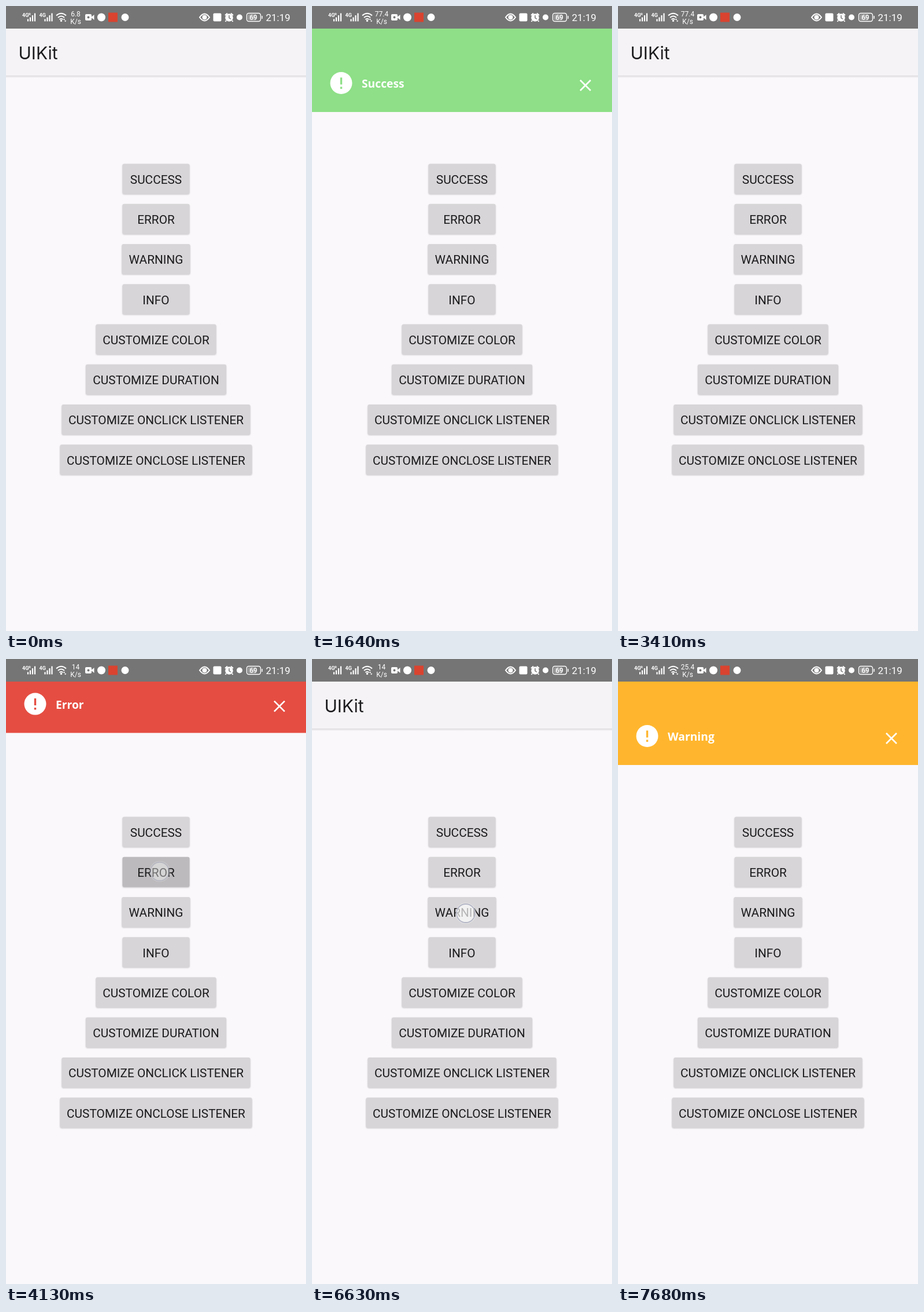
An HTML page for the animation above (8 s loop, 519 by 1079 pixels).

```html
<!DOCTYPE html>
<html lang="en">
<head>
<meta charset="utf-8">
<title>UIKit</title>
<style>
  html, body { margin: 0; width: 100%; height: 100%; overflow: hidden; background: #faf8fa; }
  svg { display: block; width: 519px; height: 1079px; font-family: Roboto, sans-serif; }
  .button { fill: #d7d5d7; filter: drop-shadow(0 1.5px 1px rgba(0, 0, 0, .2)); }
  .label { font-size: 20.8px; fill: #1a191b; text-anchor: middle; }
  .line { fill: none; stroke: #fff; }
  .mid { text-anchor: middle; }
</style>
</head>
<body>
<svg viewBox="0 0 519 1079">
  <defs>
    <linearGradient id="shade" x2="0" y2="1">
      <stop stop-color="#d9d7d9"/><stop offset="1" stop-color="#faf8fa"/>
    </linearGradient>
    <clipPath id="clip"><rect id="clipBox" width="116" height="52" rx="3"/></clipPath>
    <g id="bars">
      <path d="M10 26.5v-4M14 26.5v-7M18 26.5v-10.500M22 26.500v-14" stroke="#fff" stroke-width="2.200"/>
      <text y="19" font-size="9" font-weight="700" textLength="0">4G</text>
    </g>
  </defs>

  <rect width="519" height="1079" fill="#faf8fa"/>
  <rect y="119.500" width="519" height="5" fill="url(#shade)"/>
  <rect width="519" height="120" fill="#f5f3f5"/>
  <text x="21.500" y="91.500" font-size="30" fill="#1c1b1d" font-family="Inter, sans-serif">UIKit</text>

  <g id="buttons"></g>
  <circle id="ripple" clip-path="url(#clip)" opacity=".125"/>
  <g id="labels"></g>
  <g id="pointer">
    <circle r="18" fill="#fff" opacity=".35"/>
    <circle r="16" fill="#fff" fill-opacity=".5" stroke="#b4b6c6" stroke-width="1.800"/>
  </g>

  <g id="toast">
    <rect id="panel" y="-7" width="519" height="190"/>
    <circle cx="50.500" cy="133" r="19" fill="#fff"/>
    <path id="mark" d="M50.500 123.500v12M50.500 139.500v3.500" stroke-width="3.400"/>
    <text id="message" x="86" y="141" font-family="'Open Sans', sans-serif" font-size="19.300" font-weight="700" fill="#fff"></text>
    <path class="line" d="M464 128l18 18M482 128l-18 18" stroke-width="2.700"/>
  </g>

  <g id="status" fill="#fff">
    <rect width="519" height="39" fill="#757575"/>
    <g id="signals"></g>
    <text x="39" y="16" font-size="6" font-weight="700">R</text>
    <path class="line" d="M87 16.500q8.500-7.500 17 0M90 20q5.500-5 11 0M92.500 23.200q3-2.500 6 0" stroke-width="2"/>
    <circle cx="95.500" cy="25.500" r="1.700"/>
    <path d="M99 24l1.700-2.500 1.700 2.500zM101 25l1.700 2.500 1.700-2.500z"/>
    <g class="mid" font-size="12">
      <text id="speed" x="120.500" y="18"></text>
      <text x="120.500" y="31">K/s</text>
    </g>
    <rect x="137" y="14" width="11" height="11" rx="2"/>
    <path d="M147 19.500l5.500-4.500v9z"/>
    <circle cx="142.500" cy="19.500" r="2" fill="#757575"/>
    <circle cx="165" cy="19.500" r="7"/>
    <rect x="177" y="11.500" width="16" height="16" fill="#d9432f"/>
    <circle cx="206" cy="19.500" r="6.500"/>

    <path class="line" d="M335 19.500q8.500-12 17 0q-8.500 12-17 0z" stroke-width="2"/>
    <circle cx="343.500" cy="19.500" r="4"/>
    <rect x="358.500" y="12.500" width="14" height="14" rx="2"/>
    <circle cx="386" cy="20" r="6.800"/>
    <path class="line" d="M379 16l4-3.500M393 16l-4-3.500M381 25l-1.500 2M391 25l1.500 2" stroke-width="2"/>
    <path d="M386 16v4.500l3 2" fill="none" stroke="#757575" stroke-width="1.500"/>
    <circle cx="404" cy="19.500" r="5"/>
    <rect class="line" x="416.500" y="12.500" width="24" height="14" rx="3.500" stroke-width="1.400"/>
    <rect x="418.500" y="14.500" width="14" height="10" rx="1.500" opacity=".3"/>
    <path d="M442.300 17h1.500v5h-1.500z"/>
    <text class="mid" x="428" y="24" font-size="12" font-weight="500">69</text>
    <text x="449.500" y="26" font-size="17">21:19</text>
  </g>
</svg>
<script>
const $ = id => document.getElementById(id);
const set = (id, attrs) => Object.entries(attrs).forEach(([k, v]) => $(id).setAttribute(k, v));
const clamp = x => Math.min(1, Math.max(0, x));
const LOOP = 8000, TRAVEL = 183, ENTER = 340, LEAVE = 250;

const buttons = [
  ['SUCCESS', 116], ['ERROR', 116], ['WARNING', 118], ['INFO', 116],
  ['CUSTOMIZE COLOR', 208], ['CUSTOMIZE DURATION', 243],
  ['CUSTOMIZE ONCLICK LISTENER', 326], ['CUSTOMIZE ONCLOSE LISTENER', 332]
];
const topOf = i => 272.5 + 69.25 * i;

const alerts = [
  { text: 'Success', color: '#8edf87', touch: 1180, show: 1300, hide: 3155 },
  { text: 'Error', color: '#e54d42', touch: 3870, show: 4069, hide: 5915 },
  { text: 'Warning', color: '#ffb62e', touch: 6630, show: 6870, hide: Infinity }
];
const speeds = [[0, '6.8'], [660, '77.4'], [3670, '14'], [6680, '25.4']];

buttons.forEach(([text, w], i) => {
  const y = topOf(i);
  $('buttons').innerHTML += `<rect class="button" x="${259.5 - w / 2}" y="${y}" width="${w}" height="52" rx="3"/>`;
  $('labels').innerHTML += `<text class="label" x="259.5" y="${y + 34.3}">${text}</text>`;
});
$('bars').lastElementChild.removeAttribute('textLength');
$('signals').innerHTML = [28, 57.5].map(x => `<use href="#bars" x="${x}"/>`).join('');

function overshoot(u) {
  const s = u - 1;
  return s * s * (3 * s + 2) + 1;
}

function draw(t) {
  $('speed').textContent = speeds.findLast(([at]) => t >= at)[1];
  const i = alerts.findLastIndex(a => t >= a.touch);
  const active = i >= 0;
  for (const id of ['toast', 'ripple', 'pointer']) $(id).style.display = active ? '' : 'none';
  if (!active) return;

  const { text, color, touch, show, hide } = alerts[i];
  const place = overshoot(clamp((t - show) / ENTER)) - clamp((t - hide) / LEAVE) ** 2;
  set('toast', { transform: `translate(0 ${TRAVEL * (place - 1)})` });
  set('panel', { fill: color });
  set('mark', { stroke: color });
  $('message').textContent = text;

  const y = topOf(i) + 28 - (i === 1 ? 3 : 0);
  const w = buttons[i][1];
  set('clipBox', { x: 259.5 - w / 2, y: topOf(i), width: w });
  set('ripple', {
    cx: 266, cy: y,
    r: 75 * clamp((t - touch - 40) / 200),
    opacity: .125 * (1 - clamp((t - show - 65) / 270))
  });
  set('pointer', {
    transform: `translate(266 ${y})`,
    opacity: 1 - clamp((t - show + 10) / 170)
  });
}

function tick(now) {
  draw(now % LOOP);
  requestAnimationFrame(tick);
}
draw(0);
requestAnimationFrame(tick);
</script>
</body>
</html>
```
